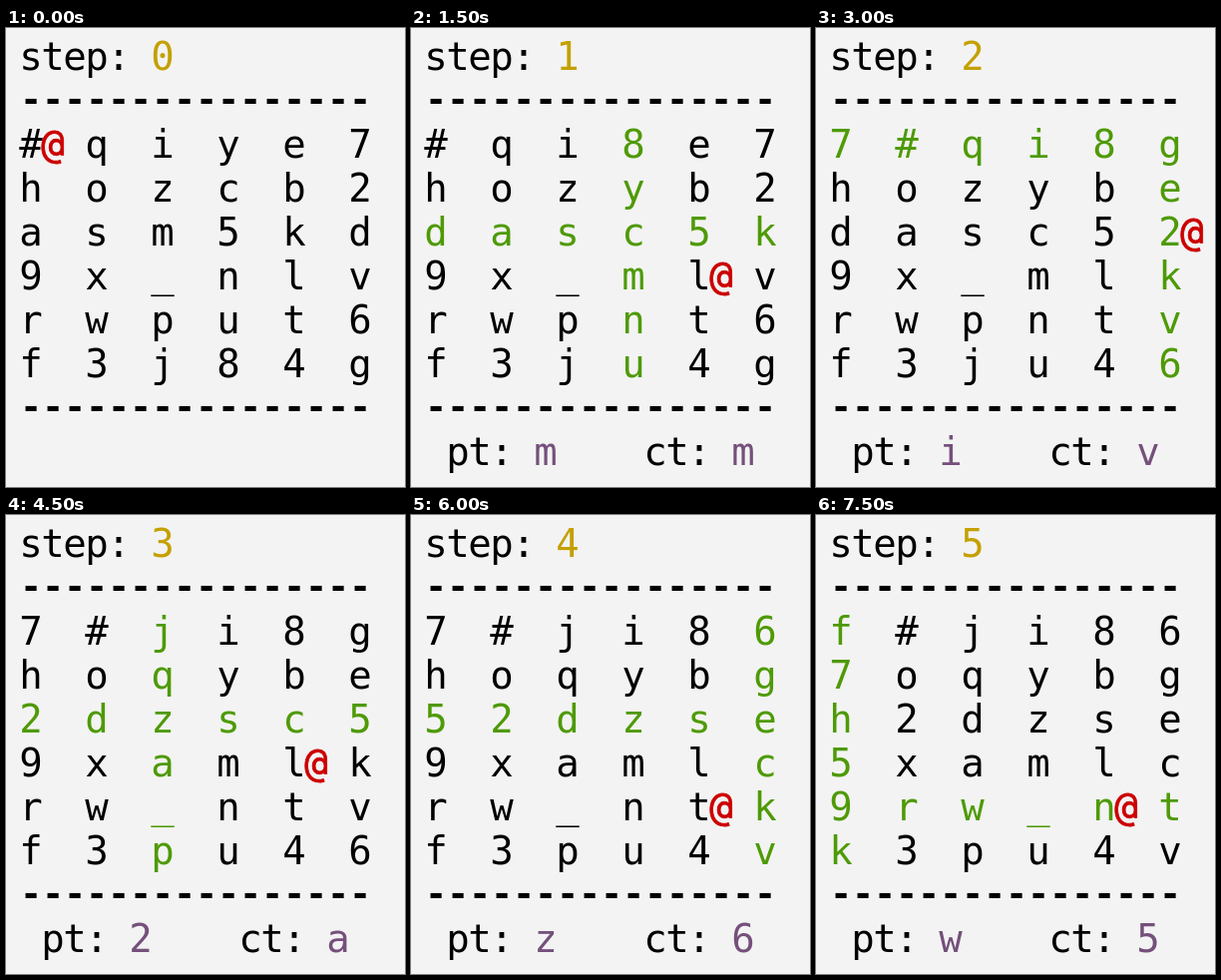
These frames come from a looping animation (400 px wide and 460 px high, 8000 ms). An HTML page:

```html
<!DOCTYPE html>
<html lang="en">
<head>
<meta charset="utf-8">
<title>Tile cipher steps</title>
<style>
  html, body { margin: 0; width: 100%; height: 100%; overflow: hidden; background: #f3f3f3; }
  svg { display: block; width: 400px; height: 460px; }
  text {
    font: 39px "DejaVu Sans Mono", "Noto Sans Mono", monospace;
    text-anchor: middle;
    white-space: pre;
    fill: #000;
  }
  .rule { font-size: 36px; font-weight: bold; }
  .count { fill: #c4a000; }
  .moved { fill: #4e9a06; }
  .letter { fill: #75507b; }
  .marker { fill: #cc0000; stroke: #cc0000; stroke-width: 0.8px; }
</style>
</head>
<body>
<svg id="stage" viewBox="0 0 400 460"></svg>
<script>
const ALPHABET = "#_23456789abcdefghijklmnopqrstuvwxyz";
const KEY = "#qiye7hozcb2asm5kd9x_nlvrwput6f3j84g";
const MESSAGE = "mi2zw";
const SIZE = 6, STEP_MS = 1500, LOOP_MS = 8000;
const CELL = 22, LINE = 44, LEFT = 14, BASELINE = 42;
const LIFT = { "_": 2.5, "-": 2 };

const stage = document.getElementById("stage");

function put(parent, string, col, row, style = "") {
  [...string].forEach((char, i) => {
    if (char === " ") return;
    const node = document.createElementNS("http://www.w3.org/2000/svg", "text");
    node.setAttribute("x", LEFT + (col + i + 0.5) * CELL);
    node.setAttribute("y", BASELINE + row * LINE - (LIFT[char] || 0));
    node.setAttribute("class", style);
    node.textContent = char;
    parent.append(node);
  });
}

// Shift a chain of cells by one place; the last wraps to the front.
function rotate(grid, cells) {
  const next = [...grid];
  cells.forEach((cell, i) => next[cells[(i + 1) % SIZE]] = grid[cell]);
  return next;
}

// Move from a cell down and right by the value of a tile, wrapping around.
function jump(cell, tile) {
  const value = ALPHABET.indexOf(tile);
  const row = (Math.floor(cell / SIZE) + Math.floor(value / SIZE)) % SIZE;
  return row * SIZE + (cell + value) % SIZE;
}

function encrypt({ grid, mark }, plain) {
  const range = [...Array(SIZE).keys()];
  const from = grid.indexOf(plain);
  const cipher = grid[jump(from, mark)];
  const row = Math.floor(from / SIZE);
  grid = rotate(grid, range.map(i => row * SIZE + i));
  const col = grid.indexOf(cipher) % SIZE;
  grid = rotate(grid, range.map(i => i * SIZE + col));
  return { grid, plain, cipher, row, col, mark: grid[jump(grid.indexOf(mark), cipher)] };
}

function draw(state, step) {
  const group = document.createElementNS("http://www.w3.org/2000/svg", "g");
  put(group, "step:", 0, 0);
  put(group, String(step), 6, 0, "count");
  put(group, "-".repeat(16), 0, 1, "rule");
  put(group, "-".repeat(16), 0, 8, "rule");
  state.grid.forEach((tile, i) => {
    const row = Math.floor(i / SIZE), col = i % SIZE;
    const moved = row === state.row || col === state.col;
    put(group, tile, col * 3, row + 2, moved ? "moved" : "");
    if (tile === state.mark) put(group, "@", col * 3 + 1, row + 2, "marker");
  });
  if (state.plain) {
    put(group, "pt:", 1, 9);
    put(group, state.plain, 5, 9, "letter");
    put(group, "ct:", 10, 9);
    put(group, state.cipher, 14, 9, "letter");
  }
  stage.append(group);
  return group;
}

const states = [{ grid: [...KEY], mark: "#" }];
for (const plain of MESSAGE) states.push(encrypt(states.at(-1), plain));
const scenes = states.map(draw);

const start = performance.now();
function tick() {
  const time = (performance.now() - start) % LOOP_MS;
  const current = Math.floor(time / STEP_MS);
  scenes.forEach((scene, i) => scene.style.display = i === current ? "" : "none");
  requestAnimationFrame(tick);
}
tick();
</script>
</body>
</html>
```
